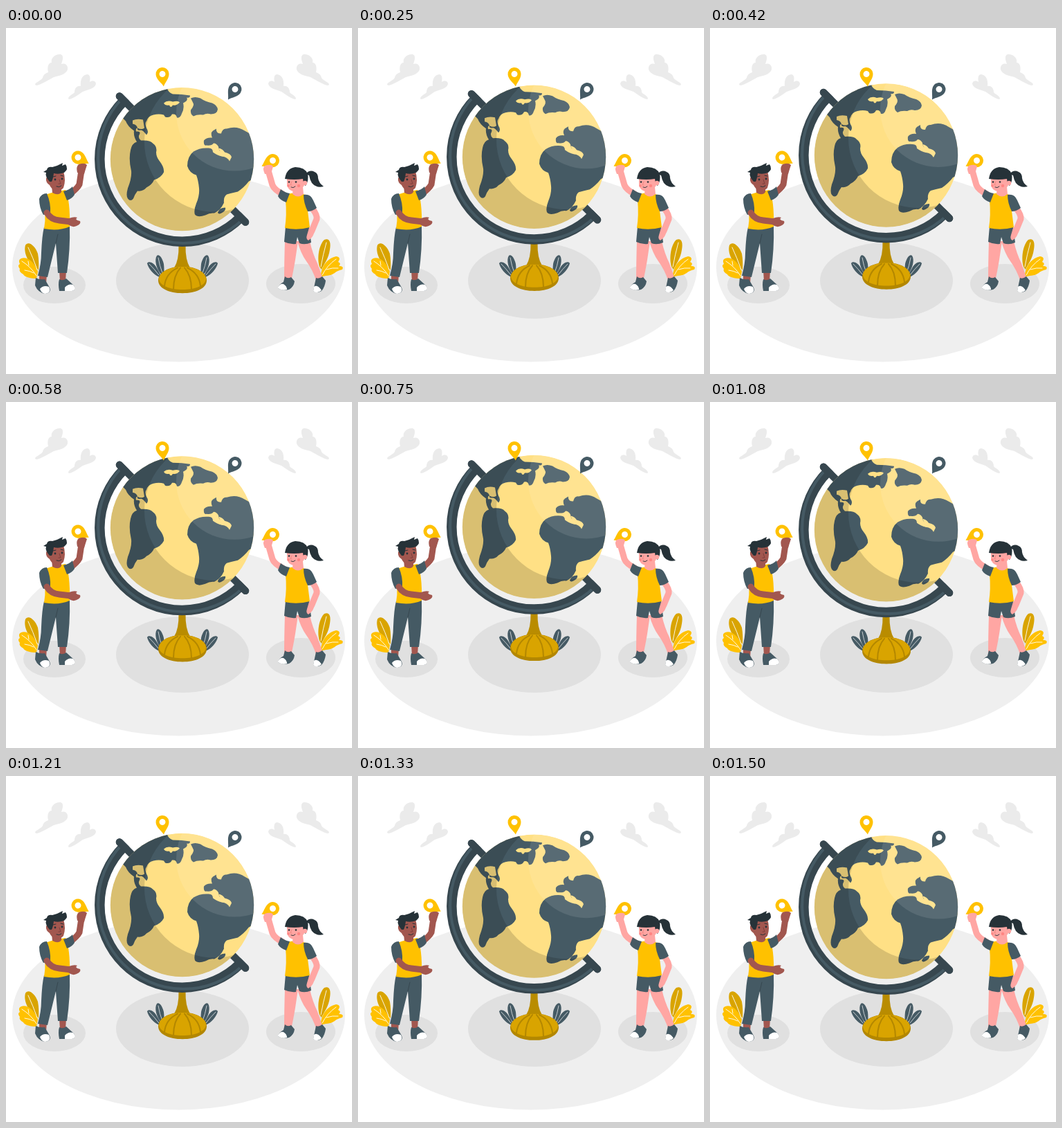
Write an HTML page that moves like this. It is 500 px wide and 500 px high and loops after 1540 ms.

```html
<!DOCTYPE html>
<html lang="en">
<head>
<meta charset="utf-8">
<title>Globe</title>
<style>
  html, body { margin: 0; width: 100%; height: 100%; overflow: hidden; background: #fff; }
  svg { display: block; width: 100vw; height: 100vh; }
  .dark { fill: #455a64; }
  .ink { fill: #263238; }
  .gold { fill: #ffc100; }
  .amber { fill: #d9a400; }
  .brown { fill: #a2574f; }
  .pink { fill: #ffa6a3; }
  .line { fill: none; stroke-linecap: round; stroke-linejoin: round; }
  .vein { stroke: #fff; stroke-width: .9; }
</style>
</head>
<body>
<svg viewBox="0 0 500 500">
  <defs>
    <clipPath id="ball"><circle cx="254.5" cy="190" r="103.7"/></clipPath>
    <g id="pin">
      <path d="M0 18C-3 12-9.5 7-9.5 0A9.5 9.5 0 0 1 9.5 0C9.5 7 3 12 0 18Z"/>
      <circle r="4.5" fill="#fff"/>
    </g>
    <g id="clouds" fill="#ebebeb">
      <path d="M42 82C42 78 50 77 53 72C54 67 58 65 61 64C59 55 62 50 66 50C64 43 72 37 79 38C84 40 82 46 80 52C86 50 90 54 89 60C86 68 76 69 69 71C60 76 50 82 44 83Z"/>
      <path d="M90 102C91 97 97 96 99 93C99 86 104 83 108 84C107 75 110 68 117 67C122 67 122 73 121 78C126 75 130 77 130 81C128 88 118 89 111 92C105 96 97 102 91 103Z"/>
    </g>
    <g id="sprigs">
      <path class="dark" d="M225 357C217 348 214 335 218 329C221 326 226 332 228 341Q229 350 228 356ZM222 360C213 357 205 346 204 340C206 336 214 339 218 347Q222 353 224 359Z"/>
      <path class="line" stroke="#fff" stroke-width=".7" d="M220 332Q222 344 226 354M207 341Q214 348 221 357"/>
    </g>
  </defs>

  <use href="#clouds"/>
  <use href="#clouds" transform="matrix(-1 0 0 1 509 0)"/>
  <ellipse cx="249.5" cy="345" rx="240.5" ry="137.5" fill="#efefef"/>
  <g fill="#e0e0e0">
    <ellipse cx="255" cy="365" rx="96" ry="55"/>
    <ellipse cx="70" cy="371.5" rx="45" ry="26.5"/>
    <ellipse cx="426" cy="369.5" rx="50" ry="28.5"/>
  </g>

  <!-- plants -->
  <path class="amber" d="M45 348C32 340 25 325 28 314C32 307 42 314 46 326Q48 337 47 350Z"/>
  <path class="gold" d="M44 362C36 362 27 360 25 356Q18 352 20 348Q16 343 20 341Q17 335 22 333C31 330 41 338 46 352Z"/>
  <path class="line vein" d="M32 317Q39 332 45 349M23 337Q36 345 44 358M27 350Q35 351 40 354M33 343L32 337"/>
  <path class="amber" d="M453 345C449 331 453 312 460 306C467 303 470 309 468 320C466 334 460 340 456 349Z"/>
  <path class="gold" d="M455 360C455 345 464 333 477 330C484 331 482 335 480 338Q485 340 481 344Q489 344 486 349Q478 351 475 354C468 359 462 357 455 360Z"/>
  <path class="line vein" d="M463 310Q458 328 455 345M477 334Q464 343 457 357M463 349Q472 346 480 347"/>

  <use href="#sprigs"/>
  <use href="#sprigs" transform="matrix(-1 0 0 1 510 0)"/>

  <g id="globe">
    <!-- stand -->
    <path fill="#b98c00" d="M249.5 314H259.5Q259 336 266 347H243Q250 336 249.5 314Z"/>
    <path fill="#b38700" d="M220 365C220 354 235 345 255 345S290 354 290 365C290 377 274 383.7 255 383.7S220 377 220 365Z"/>
    <path class="amber" d="M221 363C222 353 236 345.5 255 345.5S288 353 289 363C288 373 273 378.5 255 378.5S222 373 221 363Z"/>
    <path class="line" stroke="#b38700" stroke-width="2" d="M248 347Q231 355 229 373M252 347Q242 358 242 378M258 347Q268 358 268 378M262 347Q279 355 281 373"/>

    <!-- meridian arc -->
    <g class="line" style="stroke-linecap:butt">
      <path stroke="#37474f" stroke-width="14.5" d="M170.2 105.7A119.2 119.2 0 0 0 338.8 274.3"/>
      <path stroke="#455a64" stroke-width="4" d="M167.2 102.7A123.5 123.5 0 0 0 341.8 277.3"/>
    </g>

    <path class="line" stroke="#37474f" stroke-width="10.5" d="M164 99L186 121M328 263L346 281"/>
    <g clip-path="url(#ball)">
      <circle cx="254.5" cy="190" r="104" fill="#ffe085"/>
      <g class="dark">
        <path d="M164 126L190 80L232 84Q233 93 241 96Q254 96 266 98Q266 102 261 101Q264 105 256 109Q258 117 254 124Q252 131 247 130Q246 124 240 125Q237 131 230 129L228 126Q221 124 213 126Q205 128 203 135Q200 138 203 145Q207 151 203 155Q198 148 195 148Q189 149 190 145Q187 145 188 150Q195 149 193 154Q190 159 195 163Q208 162 212 167Q219 172 217 180Q217 187 222 193Q229 202 228 209Q224 217 214 220Q211 227 203 231Q198 237 190 236Q186 241 184 247Q180 252 176 247Q173 243 176 232Q182 217 181 207Q177 190 180 177Q182 167 189 165Q184 157 185 149Q176 143 173 135Z"/>
        <path d="M267 102Q273 99 281 102Q288 107 298 109Q305 112 306 118Q305 125 296 125Q290 123 285 126Q276 125 271 128Q266 125 267 119Q273 112 270 108Z"/>
        <path d="M286 163Q290 158 298 159Q295 152 299 149L304 146Q303 153 311 153Q313 145 319 146Q333 141 345 149L354 154L365 170V215L351 222Q344 231 335 237Q326 239 319 241Q314 245 315 253Q310 264 301 268Q295 267 288 271Q277 275 273 270Q271 264 275 254Q280 242 279 232Q278 221 275 213Q265 210 262 200Q262 186 271 179Q280 173 293 174Q299 174 299 180Q306 185 312 186Q317 186 312 180Q307 178 307 172Q304 167 300 167Q297 171 290 170Q285 171 286 163Z"/>
        <path d="M306 267Q308 260 317 260Q318 264 313 267Q307 271 306 267Z"/>
      </g>
      <g fill="#ffe085">
        <path d="M183 134Q189 131 198 133Q199 139 200 145Q196 148 190 145Q189 140 183 139Z"/>
        <path d="M228 109Q233 104 241 107Q249 105 251 108Q247 113 241 112Q238 117 236 112Q230 113 228 109Z"/>
        <path d="M307 174Q313 175 316 180Q325 182 326 187L323 193Q320 187 312 186Q307 182 310 180Z"/>
      </g>
      <circle cx="330" cy="123" r="84" fill="#fff" fill-opacity=".1"/>
      <path fill-opacity=".15" fill-rule="evenodd" d="M140 70H370V300H140ZM200 165a101 101 0 1 0 202 0a101 101 0 1 0-202 0Z"/>
    </g>
    <path class="line" stroke="#37474f" stroke-width="10.5" d="M164 99L174 109M336 271L346 281"/>
  </g>

  <use href="#pin" class="gold" transform="translate(226 66.5) rotate(-6)"/>
  <use href="#pin" class="dark" transform="translate(331 88.5) rotate(34)"/>

  <!-- boy -->
  <use href="#pin" class="gold" transform="translate(104 187) rotate(-61)"/>
  <path class="brown" d="M77 350H87L86 367H78ZM48 355H59L58 370H48Z"/>
  <path class="dark" d="M43 361Q48 364 56 363L63 375Q66 383 56 384Q46 382 42 372ZM77 363Q82 366 87 362L98 372Q102 379 94 380H77Q75 370 77 363Z"/>
  <path fill="#fff" d="M49 377Q54 371 62 374Q66 383 56 384Q51 383 49 377ZM85 375Q90 369 97 371Q103 378 95 380H85Z"/>
  <path class="dark" d="M55 288L92 286Q93 320 88 354H75L72 311L60 360L46 358Q51 340 51 325Q52 300 55 288Z"/>
  <path class="line" stroke="#37474f" stroke-width="1" d="M72 311L75 298"/>
  <path class="line" stroke="#a2574f" stroke-width="9" d="M92 240Q103 232 106 226L109 206"/>
  <path class="brown" d="M103 209Q101 200 105 197Q114 194 117 198Q114 207 113 211Z"/>
  <path class="gold" d="M57 241Q70 236 86 234Q93 250 92 287Q76 294 55 290Q59 268 53 250Z"/>
  <path class="dark" d="M83 236Q92 234 96 229L99 241Q95 247 88 249ZM48 247Q51 239 59 239Q65 253 64 267Q59 269 54 270Q48 260 48 247Z"/>
  <path class="brown" d="M66 228H80V237Q76 243 67 238Z"/>
  <path class="line" stroke="#a2574f" stroke-width="9" d="M59 267Q65 277 77 278L94 280"/>
  <path class="brown" d="M91 275Q99 272 103 274Q98 277 107 279Q109 283 102 286Q96 289 90 284Z"/>
  <path class="brown" d="M62 211Q70 203 83 207Q87 220 83 231Q78 237 70 234Q65 232 63 227Q57 223 58 217Z"/>
  <path class="ink" d="M63 222Q56 214 58 209L54 208L59 205Q60 200 67 201Q75 199 82 195L81 199L86 197Q91 204 84 209Q76 212 69 210Q68 218 66 222Z"/>
  <circle class="ink" cx="71" cy="219" r="1.4"/>
  <circle class="ink" cx="81" cy="218" r="1.4"/>
  <path class="line" stroke="#263238" stroke-width="1" d="M68 215L72 214M79 213L83 214M73 229Q77 231 80 228"/>
  <path class="line" stroke="#7f3e3b" stroke-width="1" d="M77 219L79 225L76 225"/>

  <!-- girl -->
  <use href="#pin" class="gold" transform="translate(385.5 191.5) rotate(63)"/>
  <path class="ink" d="M433 211Q439 204 446 208Q451 210 451 217Q452 224 459 229Q449 232 442 224Q439 219 438 213Z"/>
  <path class="pink" d="M403 308H422L418 335Q415 353 412 366H402Q402 340 403 308ZM421 308H439Q443 326 450 340L458 363L449 367Q443 349 434 337Q426 326 421 308Z"/>
  <path class="dark" d="M403 359Q407 363 412 360L417 366Q416 374 409 378Q399 380 393 376Q395 370 401 367ZM448 361Q452 363 457 359L462 365Q461 374 456 380Q449 384 444 380Z"/>
  <path fill="#fff" d="M393 375Q396 369 401 370Q406 373 406 378Q399 380 393 376ZM445 374Q450 370 456 379Q449 385 444 380Z"/>
  <path class="dark" d="M404 287H438L441 310Q432 314 424 311L421 302L419 312Q410 313 402 309Z"/>
  <path class="line" stroke="#ffa6a3" stroke-width="9" d="M400 240Q388 234 385 227L379 206"/>
  <path class="pink" d="M374 211Q370 202 374 199Q383 196 386 200Q384 207 383 211Z"/>
  <path class="line" stroke="#ffa6a3" stroke-width="9" d="M442 260Q450 270 449 276L442 293"/>
  <path class="pink" d="M438 289L446 292Q445 302 437 307Q433 305 435 299Z"/>
  <path class="gold" d="M407 240Q420 236 433 241L439 288Q421 293 403 289Q406 270 404 249Z"/>
  <path class="dark" d="M397 233Q403 238 410 239L405 252Q396 249 393 243ZM430 241Q440 239 444 249L449 260Q443 265 436 265Q430 253 430 241Z"/>
  <path class="pink" d="M415 230H429L430 240Q422 247 414 240Z"/>
  <path class="pink" d="M406 214Q418 207 431 214Q435 222 430 229Q424 236 415 236Q407 234 406 226Z"/>
  <path class="ink" d="M403 218Q405 203 418 201Q432 201 436 211Q438 220 433 228Q430 227 429 218Q417 220 403 218Z"/>
  <circle class="pink" cx="432" cy="224" r="3.2"/>
  <circle class="ink" cx="409" cy="222.5" r="1.3"/>
  <circle class="ink" cx="419" cy="222.5" r="1.3"/>
  <g fill="#ff8583"><circle cx="408" cy="228" r="1.8"/><circle cx="423" cy="228" r="2.2"/></g>
  <path class="line" stroke="#263238" stroke-width=".9" d="M412 230Q415 232 418 229"/>
  <path class="line" stroke="#ed847e" stroke-width=".9" d="M413 222L411 227L413 227"/>
</svg>
<script>
  const LOOP = 1540, PERIOD = 1500, LEAD = 30, LIFT = 10;
  const globe = document.getElementById('globe');

  // The globe rises and sinks at constant speed.
  function draw() {
    const phase = ((performance.now() % LOOP + LEAD) / PERIOD) % 1;
    const y = -LIFT * (1 - Math.abs(1 - 2 * phase));
    globe.setAttribute('transform', `translate(0 ${y.toFixed(3)})`);
    requestAnimationFrame(draw);
  }
  draw();
</script>
</body>
</html>
```
